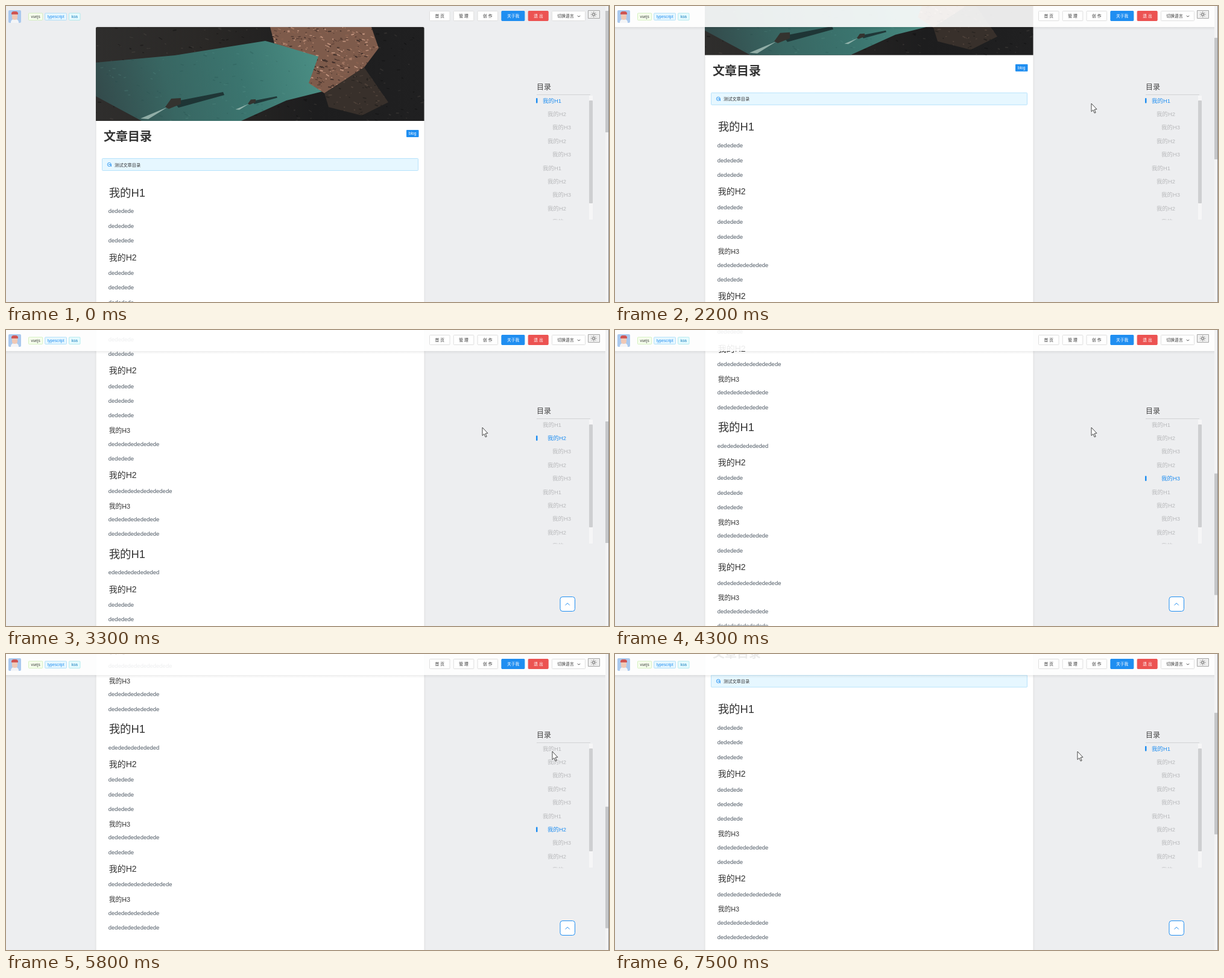
An HTML page with a canvas for the animation above (7.6 s loop, 1000 by 492 pixels).

```html
<!DOCTYPE html>
<html lang="zh">
<head>
<meta charset="utf-8">
<title>文章目录</title>
<style>
  html, body { margin: 0; width: 100%; height: 100%; overflow: hidden; background: #edeef0; }
  canvas { display: block; width: 1000px; height: 492px; }
</style>
</head>
<body>
<canvas id="stage" width="1000" height="492"></canvas>
<script>
const ctx = document.getElementById('stage').getContext('2d');
const LOOP = 7600, STEP = 100, CLICK = 5650;
const BLUE = '#1f8ef1', RED = '#ec5352', INK = '#333';
const FONT = '"Liberation Sans", "Noto Sans CJK SC", "Noto Sans CJK", sans-serif';

const clamp = v => Math.min(1, Math.max(0, v));
const smooth = p => p * p * (3 - 2 * p);
const cubic = p => p < .5 ? 4 * p ** 3 : 1 - 4 * (1 - p) ** 3;

// Each move: start time, end time, new value, easing
function follow(t, value, moves) {
  for (const [from, to, target, ease = smooth] of moves) {
    value += (target - value) * ease(clamp((t - from) / (to - from)));
  }
  return value;
}

const NOTCH = 109.2, MAX_SCROLL = 664;
const scrollAt = t => follow(t, 0, [
  [2000, 2400, 2 * NOTCH], [2600, 2700, 3 * NOTCH], [3200, 3700, 5 * NOTCH],
  [4200, 4650, MAX_SCROLL], [CLICK, CLICK + 450, 2 * NOTCH, cubic]
]);
const pointerAt = t => follow(t, 790, [[4900, 5400, 906], [6600, 6800, 767]]);

// Font size and the space taken above and below each row's centre
const STYLE = {
  H1: { size: 18.4, above: 20.8, below: 18.8 },
  H2: { size: 14, above: 15.5, below: 13.8 },
  H3: { size: 10.8, above: 13.2, below: 9.6 },
  p: { size: 9.5, above: 12.2, below: 12.2 }
};

function layout(outline) {
  let y = 289.2;
  return outline.map(item => {
    const kind = item in STYLE ? item : 'p';
    const row = { kind, y: y + STYLE[kind].above, text: kind === 'p' ? item : '我的' + item };
    y = row.y + STYLE[kind].below;
    return row;
  });
}

const de = n => 'de'.repeat(n);
const section = ['H2', de(4), de(4), de(4), 'H3', de(8), de(4), 'H2', de(10), 'H3', de(8), de(8)];
const rows = layout(['H1', de(4), de(4), de(4), ...section, 'H1', 'ed'.repeat(8), ...section]);
const headings = rows.filter(row => row.kind !== 'p');

const headingAt = t => {
  const line = scrollAt(t) + 122;
  return Math.max(0, headings.filter(h => h.y <= line).length - 1);
};

// The mark is hidden while it passes from one heading to another
function activeAt(t) {
  if (t > CLICK && t < CLICK + 200) return headingAt(CLICK);
  const now = headingAt(t);
  return now === headingAt(t - STEP) ? now : -1;
}

function text(s, x, y, size, color, weight = 400, align = 'left') {
  ctx.font = `${weight} ${size}px ${FONT}`;
  ctx.textAlign = align;
  ctx.fillStyle = color;
  ctx.fillText(s, x, y + size * .36);
}

function rect(x, y, w, h, fill) {
  ctx.fillStyle = fill;
  ctx.fillRect(x, y, w, h);
}

function line(color, width = 1) {
  ctx.strokeStyle = color;
  ctx.lineWidth = width;
  ctx.stroke();
}

function box(x, y, w, h, r, fill, stroke, width) {
  ctx.beginPath();
  ctx.roundRect(x, y, w, h, r);
  ctx.fillStyle = fill;
  ctx.fill();
  if (stroke) line(stroke, width);
}

function path(...points) {
  ctx.beginPath();
  for (let i = 0; i < points.length; i += 2) ctx.lineTo(points[i], points[i + 1]);
}

function shape(fill, ...points) {
  path(...points);
  ctx.closePath();
  ctx.fillStyle = fill;
  ctx.fill();
}

function shade(x0, y0, x1, y1, ...colors) {
  const g = ctx.createLinearGradient(x0, y0, x1, y1);
  colors.forEach((c, i) => g.addColorStop(i / (colors.length - 1), c));
  return g;
}

function seeded(seed) {
  return () => (seed = seed * 16807 % 2147483647) / 2147483647;
}

// Slanted strokes scattered over the shape that was filled last
function grain(count, x, y, w, h, colors) {
  const rnd = seeded(count);
  ctx.save();
  ctx.clip();
  for (let i = 0; i < count; i++) {
    const sx = x + rnd() * w, sy = y + rnd() * h, s = 1 + rnd() * 5;
    path(sx, sy, sx + s, sy + s * (rnd() - .3));
    line(colors[i % colors.length], 1 + rnd());
  }
  ctx.restore();
}

function boat(x, y, s) {
  ctx.save();
  ctx.translate(x, y);
  ctx.scale(s, s);
  shape('rgba(24,40,42,.8)', 0, -4, 82, -20, 84, -15, 8, 6);
  shape('rgba(175,200,192,.75)', -10, 5, -55, 24, -42, 25);
  shape('#34332f', -14, 5, -4, -9, 12, -10, 12, 0, -8, 8);
  ctx.restore();
}

function photo() {
  ctx.save();
  ctx.beginPath();
  ctx.roundRect(149, 35, 544.5, 156, [2, 2, 0, 0]);
  ctx.clip();
  rect(149, 35, 545, 156, shade(149, 0, 694, 0, '#2f2e2d', '#2a2826', '#1d1d1e', '#202021'));
  grain(260, 149, 35, 545, 156, ['rgba(95,88,82,.3)', 'rgba(10,11,12,.4)']);
  shape(shade(149, 170, 510, 80, '#33494a', '#386662', '#3b756f', '#4a8d83'),
    149, 94, 280, 82, 430, 58, 530, 85, 525, 142, 465, 157, 390, 191, 225, 191, 149, 150);
  grain(120, 149, 60, 380, 130, ['rgba(100,160,150,.2)', 'rgba(25,65,66,.2)']);
  shape('#7e5b4b', 438, 35, 606, 35, 618, 70, 594, 102, 528, 145, 502, 128, 518, 84, 445, 62);
  grain(480, 438, 35, 180, 110, ['#a77b66', '#5b4036', '#c49680', '#3d2d28', '#89604e']);
  shape('#38302b', 528, 145, 594, 102, 634, 160, 590, 182, 535, 168);
  grain(90, 528, 100, 106, 84, ['#4f423a', '#26221f']);
  boat(278, 163, 1);
  boat(408, 160, .5);
  ctx.restore();
}

function article(scroll) {
  ctx.save();
  ctx.translate(0, -scroll);
  ctx.shadowColor = 'rgba(0,0,0,.12)';
  ctx.shadowBlur = 3;
  box(149.5, 35, 544, 1079, 2, '#fff');
  ctx.shadowColor = 'transparent';
  if (scroll < 191) photo();
  text('文章目录', 162, 217, 20, INK, 600);
  box(664, 206, 20.5, 12, 1, BLUE);
  text('blog', 674.2, 212, 6.5, '#fff', 400, 'center');
  box(159.5, 253.5, 524, 20, 1, '#e6f7ff', '#a8dcfa', .8);
  ctx.beginPath();
  ctx.arc(171.3, 263.5, 3, 0, 7);
  line(BLUE, .9);
  path(170, 263.5, 174, 263.5, 174.5, 267);
  line(BLUE, .9);
  text('测试文章目录', 180, 264, 7.2, INK);
  for (const row of rows) {
    const body = row.kind === 'p';
    text(row.text, body ? 169.8 : 170.7, row.y, STYLE[row.kind].size, body ? '#4d5863' : INK, body ? 400 : 300);
  }
  ctx.restore();
}

function contents(active) {
  text('目录', 880, 135, 12, '#444', 300);
  rect(880, 147, 89, 1, '#d2d3d5');
  rect(967, 149, 6, 206, '#f6f6f7');
  box(967, 157, 6, 171, 1, '#cecfd1');
  ctx.save();
  ctx.beginPath();
  ctx.rect(878, 148, 88, 207.5);
  ctx.clip();
  headings.forEach(({ kind, text: label }, i) => {
    const y = 157.2 + i * 22.4;
    text(label, 882 + 8 * kind[1], y, 9.45, i === active ? BLUE : '#b8b9bb');
    if (i === active) box(879, y - 4.2, 2.5, 8.5, 1, BLUE);
  });
  ctx.restore();
}

function avatar() {
  box(4, 7, 21, 21, 2, '#aac9ee');
  box(8, 22, 13, 6, [5, 5, 0, 0], '#f4f5f7');
  box(10, 12, 9, 11, 4, '#f0c9b6');
  box(9, 9, 11, 5, [4, 4, 0, 0], '#cf5553');
}

function tags() {
  let x = 37;
  for (const [name, fill, stroke, color] of [
    ['vuejs', '#f6ffed', '#cdecb4', '#444'],
    ['typescript', '#e6f7ff', '#a3daf8', BLUE],
    ['koa', '#e6fbff', '#a5e5ea', '#187fbd']
  ]) {
    ctx.font = `6.5px ${FONT}`;
    const w = ctx.measureText(name).width + 9;
    box(x + .5, 12, w - 1, 11.5, 1, fill, stroke, .8);
    text(name, x + w / 2, 17.5, 6.5, color, 400, 'center');
    x += w + 3;
  }
}

function chevron(x, y, size, dir, color) {
  path(x - size, y - dir * size / 2, x, y + dir * size / 2, x + size, y - dir * size / 2);
  line(color);
}

function buttons() {
  let x = 702;
  for (const [label, w, fill] of [
    ['首 页', 34.5], ['管 理', 34.5], ['创 作', 34.5],
    ['关于我', 39, BLUE], ['退 出', 34, RED], ['切换语言', 56]
  ]) {
    box(x + .5, 8.5, w - 1, 16, 1, fill || '#fff', fill || '#dedede');
    text(label, x + 9.5, 17, 6.8, fill ? '#fff' : INK);
    x += w + 5.3;
  }
  chevron(950, 17, 2.2, 1, '#555');
}

function themeSwitch() {
  box(965.5, 7.5, 19, 13, 0, '#efefef', '#a5a5a5');
  ctx.beginPath();
  ctx.arc(974.7, 14, 2, 0, 7);
  line('#444', .9);
  for (let a = 0; a < 6.2; a += Math.PI / 4) {
    const c = Math.cos(a), s = Math.sin(a);
    path(974.7 + 3.3 * c, 14 + 3.3 * s, 974.7 + 4.7 * c, 14 + 4.7 * s);
    line('#444', .8);
  }
}

function header(solid) {
  if (solid) {
    rect(0, 35, 994, 5, shade(0, 35, 0, 40, 'rgba(0,0,0,.07)', 'rgba(0,0,0,0)'));
    rect(0, 0, 994, 35, 'rgba(255,255,255,.9)');
  }
  avatar();
  tags();
  buttons();
  themeSwitch();
}

function scrollbar(scroll) {
  rect(994, 0, 6, 492, '#f3f3f4');
  rect(994, 8 + scroll * .411, 5, 202, '#c5c6c8');
  rect(999, 0, 1, 492, '#8b8c8e');
}

function backTop(opacity) {
  ctx.globalAlpha = opacity;
  box(919, 443.5, 24.5, 24, 4, '#fff', BLUE);
  chevron(931.2, 455.7, 3.6, -1, BLUE);
  ctx.globalAlpha = 1;
}

function pointer(x, y) {
  ctx.save();
  ctx.translate(x, y);
  shape('#fff', 0, 0, 0, 13.5, 3, 10.8, 5.2, 16, 7.2, 15.1, 5, 10, 9, 9.6);
  line(INK, .9);
  ctx.restore();
}

function draw(t) {
  const scroll = scrollAt(t);
  rect(0, 0, 1000, 492, '#edeef0');
  article(scroll);
  contents(activeAt(t));
  header(scroll > 0);
  scrollbar(scroll);
  backTop(clamp((t - 2670) / 300));
  if (t >= 2000) pointer(pointerAt(t), 162);
}

const begin = performance.now();
let shown = -1;
function tick() {
  const elapsed = (performance.now() - begin) % LOOP;
  const t = Math.floor(elapsed / STEP) * STEP;
  if (t !== shown) draw(shown = t);
  requestAnimationFrame(tick);
}
tick();
</script>
</body>
</html>
```
